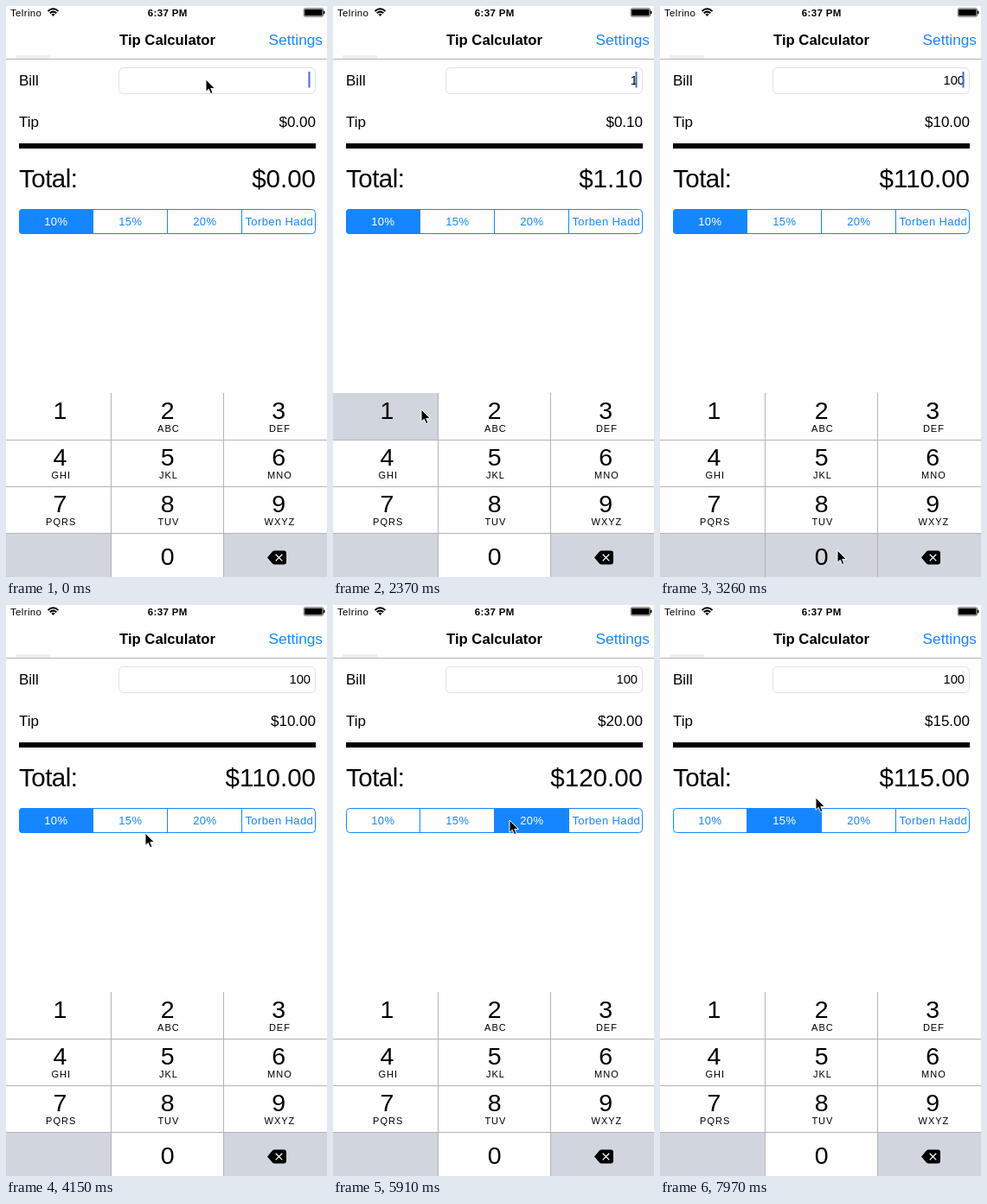
Animation, 371 px wide and 661 px high, one loop 8000 ms. Source, as an HTML page:

```html
<!DOCTYPE html>
<html lang="en">
<head>
<meta charset="utf-8">
<title>Tip Calculator</title>
<style>
  html, body { margin: 0; width: 100%; height: 100%; overflow: hidden; background: #fefefe; }
  svg { display: block; width: 371px; height: 661px; }
  text { font-family: "Liberation Sans", Arial, sans-serif; font-size: 17px; white-space: pre; }
  .end { text-anchor: end; }
  .mid { text-anchor: middle; }
  .status { font-size: 11.5px; letter-spacing: .35px; }
  .bold { font-weight: bold; }
  .big { font-size: 29.5px; }
  .seg { font-size: 13px; letter-spacing: .4px; }
  .digit { font-size: 28.5px; }
  .letters { font-size: 11px; letter-spacing: 1px; }
  .line { stroke: #b3b4b8; }
</style>
</head>
<body>
<svg viewBox="0 0 371 661">
  <defs><clipPath id="pill"><rect x="15" y="235" width="343" height="29" rx="4"/></clipPath></defs>
  <rect width="371" height="661" fill="#fefefe"/>

  <text class="status" x="5" y="11.5">Telrino</text>
  <g fill="none" stroke="#000" stroke-width="2">
    <path d="M48.5 5.9Q54.5 .7 60.5 5.9M50.7 8.3Q54.5 5 58.3 8.3"/>
    <path d="M52.4 9.6Q54.5 7.8 56.6 9.6L54.5 12Z" fill="#000" stroke="none"/>
  </g>
  <text class="status bold mid" x="186.7" y="11.5">6:37 PM</text>
  <rect x="344.3" y="2.8" width="22.2" height="9.4" rx="1.5" fill="none" stroke="#000" stroke-width=".6"/>
  <rect x="345.2" y="3.7" width="20.4" height="7.6" rx=".8"/>
  <rect x="367" y="5.5" width="1.4" height="4" rx=".7"/>

  <text class="bold mid" x="186.5" y="45" style="font-size:16.7px">Tip Calculator</text>
  <text class="end" x="366" y="45" fill="#1686ff" style="font-size:17.3px">Settings</text>
  <rect x="11" y="57" width="40" height="4" fill="#efefef"/>
  <path class="line" d="M0 61.5H371"/>

  <text x="15" y="92">Bill</text>
  <rect x="130.5" y="71.5" width="227" height="30" rx="5" fill="#fefefe" stroke="#e1e1e1"/>
  <text id="bill" class="end" x="352" y="91" style="font-size:14.7px"></text>
  <rect id="caret" x="349.5" y="76" width="2" height="18.5" fill="#426bdc"/>
  <text x="15" y="140">Tip</text>
  <text id="tip" class="end" x="358" y="140"></text>
  <rect x="15" y="159" width="343" height="6"/>
  <text class="big" x="15" y="209.5" style="letter-spacing:-.5px">Total:</text>
  <text id="total" class="big end" x="358" y="209.5"></text>

  <g id="segments"></g>
  <g id="keypad"></g>
  <path id="cursor" d="M0 0V14.3L3.3 11.3 5.6 16.6 8 15.6 5.8 10.4H10.4Z" stroke="#fff"/>
</svg>
<script>
const LOOP = 8000, STEP = 147.5;   // the screen refreshes once per step
const BLUE = '#1686ff', PRESSED = '#d1d5dd';
const $ = id => document.getElementById(id);
const clamp = value => Math.min(1, Math.max(0, value));

function add(parent, tag, attrs, content = '') {
  const el = document.createElementNS('http://www.w3.org/2000/svg', tag);
  for (const name in attrs) el.setAttribute(name, attrs[name]);
  el.textContent = content;
  return parent.appendChild(el);
}

// Segmented control: a plain layer with a filled layer above each part
const segments = ['10%', '15%', '20%', 'Torben Hadd'].map((label, i) => {
  const x = 15 + 86 * i;
  const caption = (parent, fill) =>
    add(parent, 'text', { class: 'seg mid', x: x + 42.8, y: 254, fill }, label);
  caption($('segments'), BLUE);
  if (i) add($('segments'), 'path', { d: `M${x - .5} 235V264`, stroke: BLUE });
  const layer = add($('segments'), 'g', { 'clip-path': 'url(#pill)' });
  add(layer, 'rect', { x: x - 1, y: 235, width: 87, height: 29, fill: BLUE });
  caption(layer, '#fff');
  return layer;
});
add($('segments'), 'rect',
  { x: 15.5, y: 235.5, width: 342, height: 28, rx: 4, fill: 'none', stroke: BLUE });

// Keypad
const pad = $('keypad');
const keyBox = (x, y, width, height) =>
  add(pad, 'rect', { x, y, width, height, fill: PRESSED });
keyBox(0, 611, 121, 50);
keyBox(252, 611, 119, 50);
const keys = { 1: keyBox(0, 448, 121, 54), 0: keyBox(122, 611, 129, 50) };
add(pad, 'path', { class: 'line',
  d: 'M0 502.5H371M0 556.5H371M0 610.5H371M121.5 448V661M251.5 448V661' });
['', 'ABC', 'DEF', 'GHI', 'JKL', 'MNO', 'PQRS', 'TUV', 'WXYZ'].forEach((letters, i) => {
  const x = [62.5, 186.7, 315.2][i % 3], y = 477.5 + 54 * Math.floor(i / 3);
  add(pad, 'text', { class: 'digit mid', x, y }, i + 1);
  add(pad, 'text', { class: 'letters mid', x: x + 1.2, y: y + 15.5 }, letters);
});
add(pad, 'text', { class: 'digit mid', x: 186.7, y: 647 }, '0');
add(pad, 'path', { d: 'M302 638.5L308 631.6Q309 630.5 310.5 630.5H321Q324 630.5 324 633.5V643.5Q324 646.5 321 646.5H310.5Q309 646.5 308 645.4Z' });
add(pad, 'path', { d: 'M311.7 634.8L319.3 642.4M319.3 634.8L311.7 642.4', stroke: '#fff', 'stroke-width': 1.3 });

// What the user does, timed in steps
const home = { x: 231, y: 85 };
const moves = [
  { leave: 9, arrive: 15, x: 102, y: 467 },
  { leave: 16, arrive: 20, x: 205, y: 630 },
  { leave: 24, arrive: 30.5, x: 160, y: 256 },
  { leave: 35, arrive: 39, x: 204, y: 249 },
  { leave: 41, arrive: 47, x: 152, y: 251 },
  { leave: 49, arrive: 51, x: 180, y: 223 },
];
const keyTaps = [{ at: 15, key: '1' }, { at: 20, key: '0' }, { at: 21, key: '0' }];
const choices = [{ at: 0, index: 0 }, { at: 32, index: 1 }, { at: 39, index: 2 }, { at: 48, index: 1 }];

function cursorAt(step) {
  return moves.reduce((from, to) => {
    const p = clamp((step - to.leave) / (to.arrive - to.leave));
    const eased = 1 - (1 - p) ** 4;
    return { x: from.x + (to.x - from.x) * eased, y: from.y + (to.y - from.y) * eased };
  }, home);
}

// Blinks every seven steps, but stays solid while digits are typed
function caretAt(step) {
  const first = keyTaps[0].at, settled = keyTaps.at(-1).at + 2.6;
  const phase = step < first ? step : Math.max(0, step - settled);
  return clamp(.5 + 1.2 * (Math.cos(phase * 2 * Math.PI / 7) + .22));
}

function render(time) {
  const step = Math.floor(time / STEP);
  const bill = keyTaps.filter(tap => step > tap.at).map(tap => tap.key).join('');
  const held = keyTaps.find(tap => step >= tap.at && step < tap.at + 2);
  const [choice, before = choice] = choices.filter(c => c.at <= step).reverse();
  const fade = step === choice.at ? .5 : 1;
  const tip = bill * (10 + 5 * choice.index) / 100;
  const cursor = cursorAt(step);

  $('bill').textContent = bill;
  $('tip').textContent = '$' + tip.toFixed(2);
  $('total').textContent = '$' + (+bill + tip).toFixed(2);
  $('caret').setAttribute('opacity', caretAt(step));
  for (const name in keys) keys[name].setAttribute('opacity', held?.key === name ? 1 : 0);
  segments.forEach((layer, i) => {
    const shown = choice === before ? 1 : fade;
    layer.setAttribute('opacity', i === choice.index ? shown : i === before.index ? 1 - shown : 0);
  });
  $('cursor').setAttribute('transform', `translate(${cursor.x} ${cursor.y})`);
}

const start = performance.now();
function tick() {
  render((performance.now() - start) % LOOP);
  requestAnimationFrame(tick);
}
tick();
</script>
</body>
</html>
```
